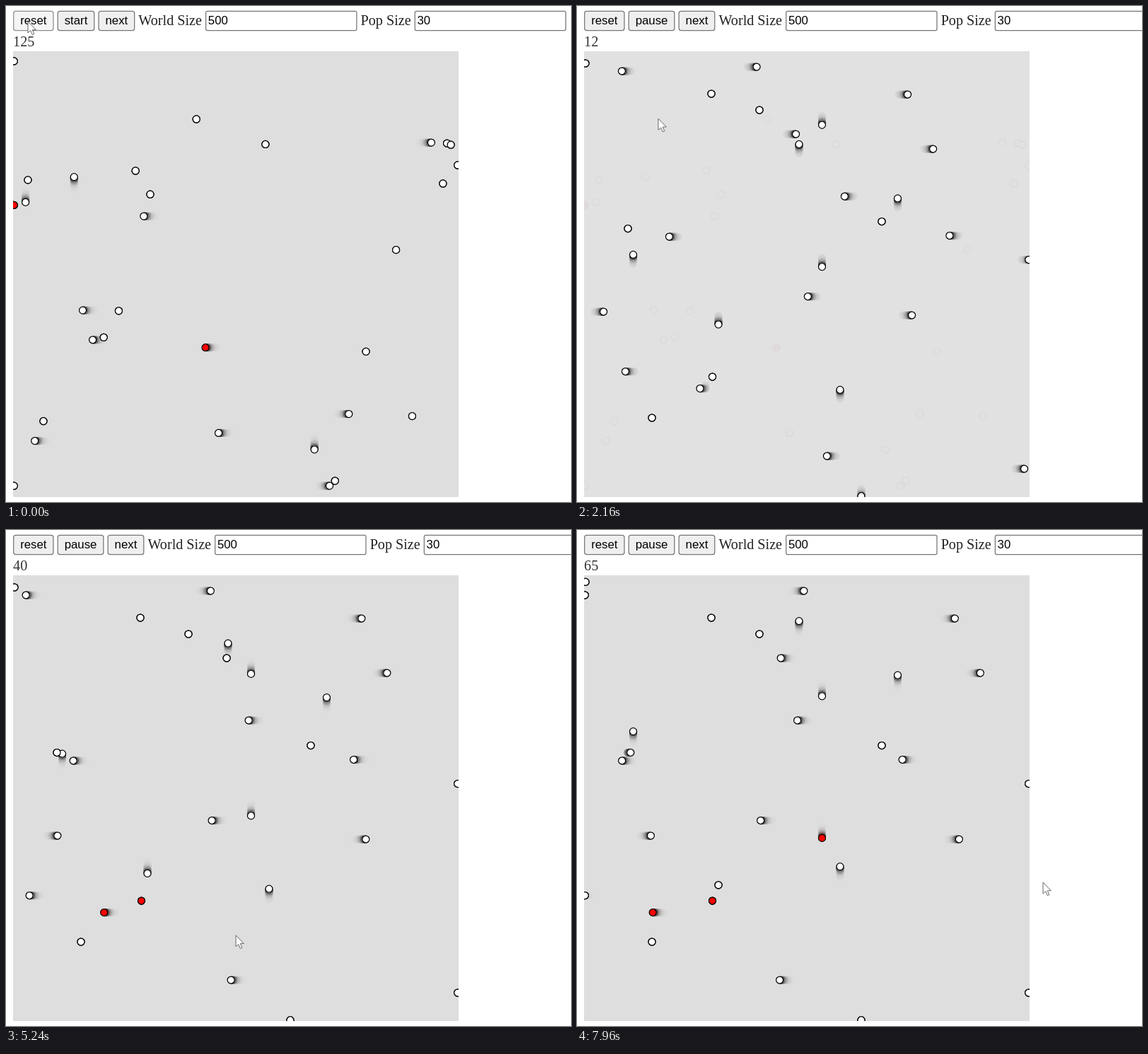
An HTML page with a canvas that plays this animation: 799 px wide and 701 px high, repeating every 8000 ms.

```html
<!DOCTYPE html>
<html>
<head>
<meta charset="utf-8">
<style>
html, body { margin: 0; width: 100%; height: 100%; overflow: hidden; background: #fff; }
canvas { display: block; }
</style>
</head>
<body>
<canvas id="stage" width="799" height="701"></canvas>
<script>
const LOOP = 8000, RESET = 80, START = 1020, OLD_STEP = 125, TRAIL = 14;
const SCALE = 1.26, LEFT = 10, TOP = 64, SIZE = 630, MARGIN = 8 * SCALE, GAP = 4 * SCALE;
const UI_FONT = '16.8px "Liberation Sans", Arial, sans-serif';
const TEXT_FONT = '20.16px "Liberation Serif", "Times New Roman", serif';
const HEADINGS = { left: [-1, 0], right: [1, 0], up: [0, -1], down: [0, 1], still: [0, 0] };

const ctx = document.getElementById('stage').getContext('2d');
const world = document.createElement('canvas');
world.width = world.height = SIZE;
const wctx = world.getContext('2d');
wctx.translate(-LEFT, -TOP);

function seededRandom(seed) {
  return () => (seed = (seed * 16807) % 2147483647) / 2147483647;
}

// A leg is [heading, first step]; it lasts until the next leg begins.
const cell = (x, y, legs, sickAt = Infinity) => ({ x, y, legs, sickAt });
const herd = (heading, ...points) => points.map(([x, y, sickAt]) => cell(x, y, [[heading, 2]], sickAt));

// Half the old cells rest, the others have walked straight on, some of them into a wall.
const random = seededRandom(2024);
const oldCells = Array.from({ length: 31 }, (_, i) => {
  const heading = i % 2 ? 'still' : Object.keys(HEADINGS)[Math.floor(random() * 4)];
  return cell(LEFT + random() * SIZE, TOP + random() * SIZE, [[heading, 0]], i % 16 ? Infinity : 0);
});

const newCells = [
  ...herd('still', [190, 124], [258, 147], [431, 304.5], [191.5, 524, 25], [106, 582]),
  ...herd('up', [314, 208], [453.5, 284.5], [79.5, 364], [372, 555]),
  ...herd('down', [346.5, 155.5], [346.5, 356, 57], [402, 682.5]),
  ...herd('left', [76, 92], [391, 269], [143, 326], [539.5, 324.5], [339, 410.5], [81, 516.5], [366, 636]),
  ...herd('right', [241.5, 86], [455, 125], [491, 202], [629, 358.5], [25, 432], [461, 437], [620, 654]),
  cell(12, 81, [['still', 2], ['up', 42], ['still', 48]]),
  cell(297, 181, [['right', 2], ['still', 14], ['left', 46]]),
  cell(72, 314.5, [['still', 2], ['right', 62]]),
  cell(200, 437.5, [['down', 2], ['still', 53]]),
  cell(181.5, 535.5, [['down', 2], ['left', 6]], 25)
];

const cursorPath = [[160, 31, 22], [800, 92, 17], [1800, 92, 17], [3120, 176, 537],
  [4080, 255, 631], [5240, 325, 573], [6200, 389, 433], [7960, 659, 498]];
const stepPath = [[START, 2.05], [6200, 48.95], [7960, 65.05]];

function follow(path, t) {
  const i = path.findIndex(key => key[0] > t);
  if (i === 0) return path[0].slice(1);
  if (i < 0) return path[path.length - 1].slice(1);
  const a = path[i - 1], b = path[i], k = (t - a[0]) / (b[0] - a[0]);
  return a.slice(1).map((v, j) => v + (b[j + 1] - v) * k);
}

const clamp = (v, origin) => Math.max(origin + SCALE, Math.min(origin + SIZE - SCALE, v));

function drawCells(cells, step) {
  wctx.lineWidth = 1.25;
  wctx.strokeStyle = '#000';
  for (let { x, y, legs, sickAt } of cells) {
    legs.forEach(([heading, from], i) => {
      const to = i + 1 < legs.length ? legs[i + 1][1] : Infinity;
      const walked = Math.max(0, Math.min(step, to) - from) * SCALE;
      x += HEADINGS[heading][0] * walked;
      y += HEADINGS[heading][1] * walked;
    });
    wctx.beginPath();
    wctx.arc(clamp(x, LEFT), clamp(y, TOP), 5, 0, Math.PI * 2);
    wctx.fillStyle = step >= sickAt ? '#f00' : '#fff';
    wctx.fill();
    wctx.stroke();
  }
}

function fillWorld(color) {
  wctx.fillStyle = color;
  wctx.fillRect(LEFT, TOP, SIZE, SIZE);
}

let drawnStep;

// Each step veils the picture and draws the cells anew, which leaves fading trails.
function updateWorld(step) {
  if (step === drawnStep) return;
  drawnStep = step;
  const first = Math.max(1, step - TRAIL);
  fillWorld(first === 1 ? '#fff' : '#ddd');
  for (let s = first; s <= step; s++) {
    fillWorld('rgba(221,221,221,.28)');
    if (step === OLD_STEP) drawCells(oldCells, s);
    else if (s === 1) drawCells(oldCells, OLD_STEP);
    else drawCells(newCells, s);
  }
}

function box(x, width, fill, border, radius) {
  ctx.beginPath();
  ctx.roundRect(x + .6, 7.4, width - 1.2, 27.2, radius);
  ctx.fillStyle = fill;
  ctx.fill();
  ctx.lineWidth = 1.25;
  ctx.strokeStyle = border;
  ctx.stroke();
}

function text(str, x, y, font, color) {
  ctx.font = font;
  ctx.fillStyle = color;
  ctx.fillText(str, x, y);
  return ctx.measureText(str).width;
}

function button(label, x, cursor, pressed) {
  ctx.font = UI_FONT;
  const width = ctx.measureText(label).width + MARGIN * 2;
  const hover = cursor[0] >= x && cursor[0] <= x + width && cursor[1] >= 7 && cursor[1] <= 35;
  if (hover && pressed) box(x, width, '#f5f5f5', '#8d8d8d', 3);
  else if (hover) box(x, width, '#e5e5e5', '#4f4f4f', 3);
  else box(x, width, '#efefef', '#767676', 3);
  text(label, x + MARGIN, 26, UI_FONT, '#000');
  return x + width + GAP;
}

function field(label, value, x) {
  const width = 214.5;
  x += text(label, x, 26.5, TEXT_FONT, '#222') + GAP;
  box(x, width, '#fff', '#767676', 2);
  text(value, x + 3.8, 26, UI_FONT, '#000');
  return x + width + GAP;
}

function drawCursor(x, y) {
  ctx.save();
  ctx.translate(x, y);
  ctx.fillStyle = '#fff';
  ctx.strokeStyle = '#666';
  ctx.lineWidth = 1;
  const arrow = new Path2D('M0 0V16L3.7 12.7 6.3 18.6 8.8 17.5 6.3 11.8 11.3 11.6Z');
  ctx.fill(arrow);
  ctx.stroke(arrow);
  ctx.restore();
}

function render(t) {
  const step = t < RESET ? OLD_STEP : t < START ? 1 : Math.floor(follow(stepPath, t)[0]);
  const cursor = follow(cursorPath, t);
  const pressed = t < RESET || (t > START - 80 && t < START);
  updateWorld(step);

  ctx.fillStyle = '#fff';
  ctx.fillRect(0, 0, 799, 701);
  let x = button('reset', MARGIN, cursor, pressed);
  x = button(t < START ? 'start' : 'pause', x, cursor, pressed);
  x = button('next', x, cursor, pressed);
  x = field('World Size', '500', x);
  field('Pop Size', '30', x);
  text(step, MARGIN, 56.5, TEXT_FONT, '#333');
  ctx.drawImage(world, LEFT, TOP);
  drawCursor(...cursor);
}

const begin = performance.now();
function tick() {
  render((performance.now() - begin) % LOOP);
  requestAnimationFrame(tick);
}
tick();
</script>
</body>
</html>
```
